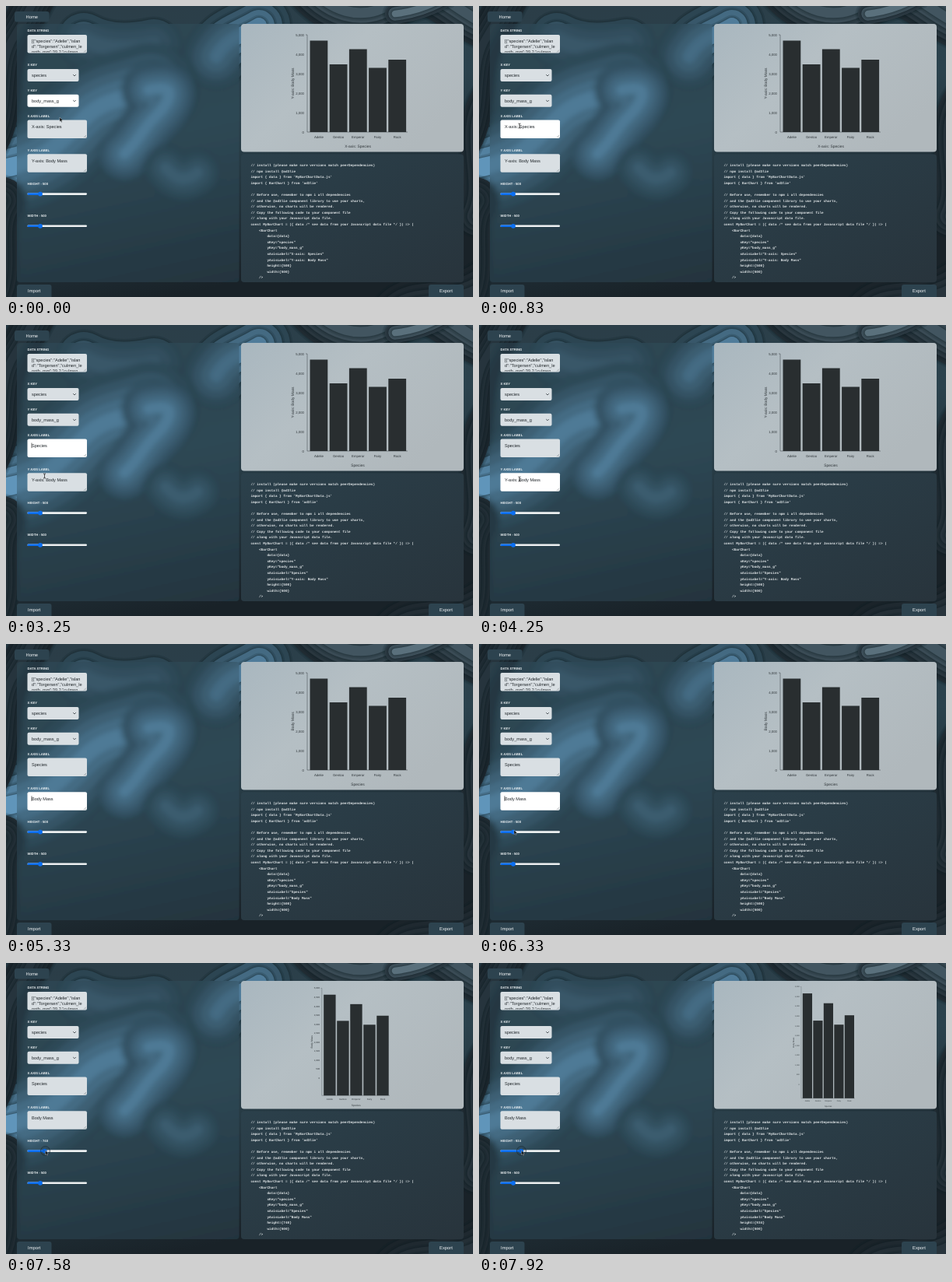
Animation of 600 by 374 pixels, one loop 8 s. Source, as an HTML page:

```html
<!DOCTYPE html>
<html lang="en">
<head>
<meta charset="utf-8">
<title>Chart builder</title>
<style>
  html, body { margin: 0; width: 100%; height: 100%; overflow: hidden; background: #1f292f; }
  svg { display: block; width: 100vw; height: 100vh; }
  text { font-family: "Liberation Sans", Arial, sans-serif; white-space: pre; text-rendering: geometricPrecision; }
  .code { font: bold 4.36px "Liberation Mono", "Courier New", monospace; fill: #e2e7e9; }
  .label { font-size: 4.2px; font-weight: bold; fill: #eef2f4; }
  .field { font-size: 5.6px; fill: #20262a; }
  .button { font-size: 5.8px; fill: #f4f6f7; text-anchor: middle; }
</style>
</head>
<body>
<svg viewBox="0 0 600 374" preserveAspectRatio="none">
  <defs>
    <filter id="blur" x="0" y="0" width="600" height="374" filterUnits="userSpaceOnUse"><feGaussianBlur stdDeviation="3.6"/></filter>
    <linearGradient id="wall" x1="0" y1="0" x2=".35" y2="1">
      <stop stop-color="#2b3d47"/><stop offset=".5" stop-color="#2b424d"/><stop offset="1" stop-color="#192228"/>
    </linearGradient>
    <linearGradient id="light" x1="0" y1="0" x2="1" y2=".6">
      <stop stop-color="#a9b7bf"/><stop offset=".45" stop-color="#b5bfc4"/><stop offset="1" stop-color="#b0b8bc"/>
    </linearGradient>
    <linearGradient id="dark" x1="0" y1="0" x2="1" y2="1">
      <stop stop-color="#2b404b"/><stop offset="1" stop-color="#28343c"/>
    </linearGradient>
    <clipPath id="formClip"><rect x="14" y="23" width="285.5" height="332" rx="4"/></clipPath>
    <clipPath id="dataClip"><rect x="28" y="38" width="75" height="21.5"/></clipPath>
  </defs>
  <g id="wallpaper"></g>
  <g clip-path="url(#formClip)">
    <use href="#wallpaper" filter="url(#blur)"/>
    <rect x="14" y="23" width="286" height="332" fill="#345260" opacity=".4"/>
  </g>
  <g id="ui"></g>
  <g id="live"></g>
</svg>
<script>
const $ = id => document.getElementById(id);
const mix = (a, b, k) => a + (b - a) * k;
const rect = (x, y, w, h, fill, rx = 0) =>
  `<rect x="${x}" y="${y}" width="${w}" height="${h}" rx="${rx}" fill="${fill}"/>`;
const text = (x, y, str, attrs) =>
  `<text x="${x}" y="${y}" ${attrs}>${str.replace(/</g, '&lt;')}</text>`;

// One spine stroked ever thinner gives nested paper-cut layers.
function ridge(d, width, layers, from, to) {
  let out = '';
  for (let i = 0; i < layers; i++) {
    const w = width * (1 - i / layers), k = i / (layers - 1);
    const color = from.map((c, j) => Math.round(mix(c, to[j], k)));
    const line = (w, stroke, opacity) => `<path d="${d}" fill="none" stroke="${stroke}" stroke-opacity="${opacity}" stroke-width="${w}" stroke-linecap="round" stroke-linejoin="round"/>`;
    out += line(w + 7, '#0b1a22', .16) + line(w + 3, '#0b1a22', .2) + line(w, `rgb(${color})`, 1);
  }
  return out;
}

const teal = [44, 69, 82], blue = [96, 149, 186], slate = [32, 43, 50];
$('wallpaper').innerHTML = rect(0, 0, 600, 374, 'url(#wall)') +
  ridge('M100 42 Q135 62 190 50', 66, 3, teal, [60, 91, 110]) +
  ridge('M325 25 C300 40 285 40 270 65', 80, 4, teal, [80, 124, 154]) +
  ridge('M0 208 C50 200 75 170 100 145 S150 120 185 108', 118, 5, teal, blue) +
  ridge('M183 108 C222 98 212 122 192 142 S172 172 152 190', 66, 4, [54, 85, 105], blue) +
  ridge('M205 208 Q225 232 246 214', 54, 3, teal, [64, 99, 120]) +
  ridge('M-25 180 C5 130 -15 80 10 40 S30 0 50 -30', 50, 5, [28, 38, 45], [38, 52, 61]) +
  ridge('M-30 380 C0 340 -30 290 -5 250', 60, 5, slate, [35, 49, 57]) +
  ridge('M375 -45 C410 10 460 25 505 -10 S580 20 640 30', 64, 5, slate, [66, 85, 96]) +
  ridge('M500 10 Q535 6 565 -12', 26, 3, [46, 60, 69], [90, 112, 124]) +
  ridge('M630 110 C585 160 630 220 605 270', 50, 4, slate, [42, 55, 63]) +
  ridge('M490 420 C510 350 570 410 640 340', 64, 4, [27, 36, 42], [40, 52, 60]);

const button = (x, y, w, h, str, base) => rect(x, y, w, h, '#2d434f', 3) + text(x + w / 2, base, str, 'class="button"');
const label = (y, str) => text(27.5, y, str, 'class="label"');
const slider = (y, x) => rect(27.5, y - 1.3, 76.5, 2.6, '#edf0f1', 1.3) +
  rect(27.5, y - 1.3, x - 27.5, 2.6, '#0b6ff2', 1.3) + `<circle cx="${x}" cy="${y}" r="2.9" fill="#0b6ff2"/>`;
const box = (y, w, h, focused) => rect(27.5, y, w, h, focused ? '#fff' : '#d9dfe3', 2);
const grip = y => `<path d="M103 ${y - 4}l-3 3M103 ${y - 2}l-1 1" stroke="#6d767b" stroke-width=".5"/>`;
const select = (y, str, focused) => box(y, 66, 16, focused) + text(33, y + 10, str, 'class="field"') +
  `<path d="M86.2 ${y + 7.2}l1.8 1.8 1.8-1.8" fill="none" stroke="#30383d" stroke-width=".8"/>`;

function area(y, str, { focused, selected = 0, caret }) {
  return box(y, 76.5, 23.5, focused) + grip(y + 23.5) +
    (selected ? rect(33 + 19 - selected, y + 4.8, selected, 6.6, '#86bce8') : '') +
    text(33, y + 10.5, str, 'class="field"') +
    (caret ? rect(32.7, y + 5, .6, 6.6, '#111') : '');
}

$('ui').innerHTML =
  button(11, 7, 44.5, 13.5, 'Home', 15.6) + button(14, 358, 44.5, 18, 'Import', 368.4) + button(543, 358, 45, 18, 'Export', 368.4) +
  rect(302, 23, 286, 164.5, 'url(#light)', 4) + rect(302, 190.5, 286, 164.5, 'url(#dark)', 4) +
  label(33, 'DATA STRING') + label(77, 'X KEY') + label(109.5, 'Y KEY') + label(142.5, 'X AXIS LABEL') +
  label(186.5, 'Y AXIS LABEL') + label(271, 'WIDTH - 500') + slider(282.8, 44) +
  box(37, 76.5, 23.5) + grip(60.5) + '<g clip-path="url(#dataClip)">' +
  ['[{"species":"Adelie","islan', 'd":"Torgersen","culmen_le', 'ngth_mm":39.2,"culmen_']
    .map((s, i) => text(33, 47 + 6.8 * i, s, 'class="field"')).join('') + '</g>' +
  select(81, 'species');

const bars = [['Adelie', 4700], ['Gentoo', 3480], ['Emperor', 4260], ['Fairy', 3300], ['Rock', 3720]];

// Drawn in local units where the 500-wide chart is as wide as the panel is high, then scaled to fit.
function chart(height, xLabel, yLabel) {
  const scale = 500 / height, full = 164.5 / scale, top = 14, bottom = full - 25.5, span = bottom - top;
  const lag = height > 500 ? span - 33 * Math.min(1, (height - 500) / 100) : span;
  const ticks = height > 500 ? 10 : 5, ink = 'fill="#30363a" font-size="4.3"';
  let out = `<path d="M22.5 ${top}H24.5V${bottom}H153.5" fill="none" stroke="#3b4246" stroke-width=".5"/>`;
  for (let i = 0; i <= ticks; i++)
    out += text(20.5, top + 1.5 + lag * i / ticks, (5000 * (1 - i / ticks)).toLocaleString('en-US'), ink + ' text-anchor="end"');
  bars.forEach(([name, value], i) => {
    const x = 28 + i * 25.2, h = span * value / 5000;
    out += rect(x, bottom - h, 22.8, h, '#292e30') + text(x + 11.4, bottom + 8.3, name, ink + ' text-anchor="middle"');
  });
  const title = 'fill="#30363a" font-size="4.9" text-anchor="middle"';
  out += text(89.5, full - 5.5, xLabel, title) +
    text(0, 0, yLabel, `${title} transform="translate(7.3 ${top + span / 2}) rotate(-90)"`);
  return `<g transform="translate(${445 - 82.5 * scale} 23) scale(${scale})">${out}</g>`;
}

const code = (height, xLabel, yLabel) => `// install (please make sure versions match peerDependencies)
// npm install @ad3lie
import { data } from 'MyBarChartData.js'
import { BarChart } from 'ad3lie'

// Before use, remember to npm i all dependencies
// and the @ad3lie component library to use your charts,
// otherwise, no charts will be rendered.
// Copy the following code to your component file
// along with your Javascript data file.
const MyBarChart = ({ data /* see data from your Javascript data file */ }) => (
    <BarChart
        data={data}
        xKey="species"
        yKey="body_mass_g"
        xAxisLabel="${xLabel}"
        yAxisLabel="${yLabel}"
        height={${height}}
        width={500}
    />`.split('\n').map((s, i) => text(314.5, 205.9 + 7.6 * i, s, 'class="code"')).join('');

function track(keys, t) {
  const n = keys.findIndex(k => k[0] > t);
  if (n < 0) return keys[keys.length - 1].slice(1);
  if (n === 0) return keys[0].slice(1);
  const a = keys[n - 1], b = keys[n], k = (t - a[0]) / (b[0] - a[0]);
  return a.slice(1).map((v, i) => mix(v, b[i + 1], k));
}
const pointerPath = [[0, 69, 143], [830, 52, 154], [1000, 52, 154], [1667, 26, 153], [2500, 27, 155],
  [3250, 49.5, 194], [3700, 52, 198], [4250, 52, 198], [4750, 23, 198], [5500, 27, 198],
  [6330, 45, 239], [7250, 45, 241], [7583, 50.5, 241], [7917, 54.5, 241]];
const heightPath = [[7250, 500], [7583, 740], [7917, 934]];
const clearX = 1917, clearY = 5000, release = 6417;

function pointer(t) {
  const [x, y] = track(pointerPath, t);
  if ((t >= 1750 && t < 2490) || (t >= 4910 && t < 5570)) return '';
  const ring = t > 6750 ? `<circle cx="${x}" cy="241.5" r="6" fill="#123" fill-opacity=".12" stroke="#1b2931" stroke-width=".6"/>` : '';
  const beam = (t > 600 && t < 1500) || (t > 3100 && t < 4600);
  return ring + `<g transform="translate(${x} ${y})">` + (beam
    ? '<path d="M-1.5-3Q0-3 0-2V2Q0 3-1.5 3M1.5-3Q0-3 0-2M0 2Q0 3 1.5 3" fill="none" stroke="#111" stroke-width=".7"/>'
    : '<path d="M0 0V5.6L1.3 4.4 2.2 6.4 3.1 6 2.3 4.1H4Z" fill="#0b0d0e" stroke="#dfe5e8" stroke-width=".35"/>') + '</g>';
}

function draw(t) {
  const xLabel = t < clearX ? 'X-axis: Species' : 'Species';
  const yLabel = t < clearY ? 'Y-axis: Body Mass' : 'Body Mass';
  const height = Math.round(track(heightPath, t)[0]);
  const blink = start => t >= start && Math.floor((t - start) / 500) % 2 === 0;
  const inX = t > 580 && t < 3580, inY = t > 3580 && t < release;
  const dragged = Math.min(19, Math.max(0, 52 - track(pointerPath, t)[0]));
  $('live').innerHTML = select(113.8, 'body_mass_g', t < 580) +
    area(146.5, xLabel, { focused: inX, selected: t > 1000 && t < clearX ? dragged : 0, caret: inX && blink(clearX) }) +
    area(190.3, yLabel, { focused: inY, selected: t > 4250 && t < clearY ? dragged : 0, caret: inY && blink(clearY) }) +
    label(230, `HEIGHT - ${height}`) + slider(241.6, 44 + (height - 500) * .0235) +
    chart(height, xLabel, yLabel) + code(height, xLabel, yLabel) + pointer(t);
}

const FRAME = 1000 / 12;
let shown = -1;
function play(now) {
  const step = Math.floor((now % 8000 + 4) / FRAME) % 96;
  if (step !== shown) draw((shown = step) * FRAME);
  requestAnimationFrame(play);
}
draw(0);
requestAnimationFrame(play);
</script>
</body>
</html>
```
